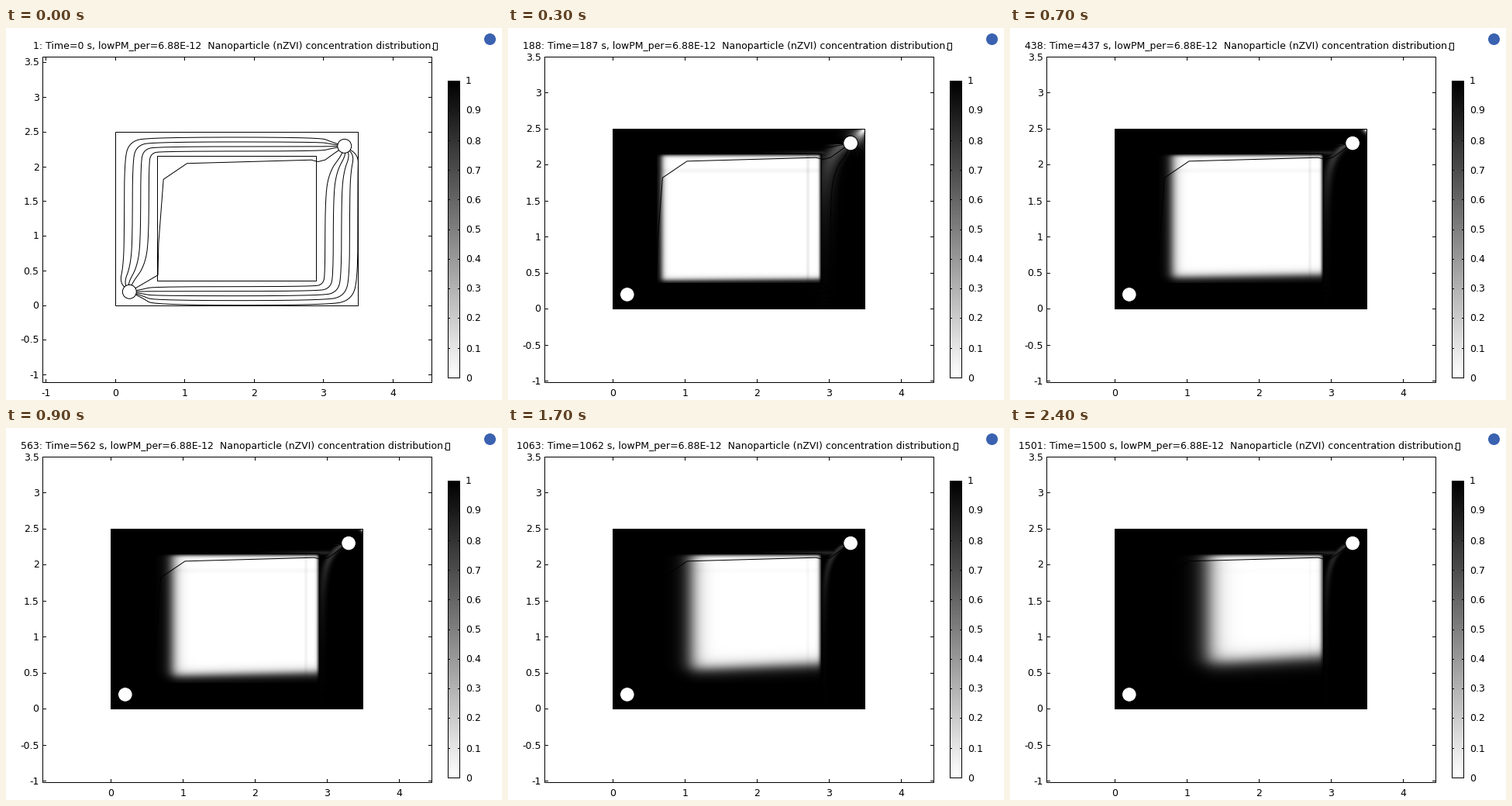
A matplotlib script that plays this animation: 640 by 480 pixels, repeating every 2500 ms.

```python
import numpy as np
import matplotlib.pyplot as plt
from matplotlib.animation import FuncAnimation
from matplotlib.patches import Circle, Rectangle

W, H, DPI = 640, 480, 80
PX = 72 / DPI
FRAMES, INTERVAL = 25, 100
STEP = 62.5  # simulated seconds per frame

plt.rcParams["font.family"] = "DejaVu Sans"
fig = plt.figure(figsize=(W / DPI, H / DPI), dpi=DPI, facecolor="white")
ax = fig.add_axes([0, 0, 1, 1])

# view: pixel position of the data origin and pixels per unit
START = (141.4, 358.2, 89.5)
ZOOM = (135.2, 362.5, 93.0)
BOX = (47, 37, 549, 457)
WIDE, TALL = 3.5, 2.5
INLET, OUTLET = (0.2, 0.2), (3.3, 2.3)
BLOCK = (0.6, 0.35, 2.9, 2.15)


def smooth(pts, rounds=4):
    """Corner cutting that keeps both ends."""
    p = np.array(pts, float)
    for _ in range(rounds):
        a, b = p[:-1], p[1:]
        cut = np.stack([0.75 * a + 0.25 * b, 0.25 * a + 0.75 * b], 1)
        p = np.vstack([p[:1], cut.reshape(-1, 2), p[-1:]])
    return p


def stream(k):
    """Line k, counted inwards from the wall, up the left and along the top."""
    x, y, r = 0.125 + 0.118 * k, 2.427 - 0.067 * k, 0.35 - 0.06 * k
    return smooth([
        INLET, (0.06 + 0.06 * k, 0.33), (0.85 * x, 0.55), (x, 0.9),
        (x, y - r), (x + 0.2 * r, y - 0.2 * r), (x + r, y),
        (2.95, y), (3.1, 0.5 * y + 1.15), OUTLET])


# the flow is symmetric under a half turn about the centre
STREAMS = [stream(k) for k in range(4)]
STREAMS += [(WIDE, TALL) - stream(k) for k in range(-1, 4)]
STREAMS.append(np.array([
    INLET, (0.61, 0.44), (0.62, 0.9), (0.69, 1.82), (1.03, 2.05),
    (2.82, 2.1), (2.92, 2.075), (3.02, 2.1), OUTLET]))

X0, Y0, X1, Y1 = 135, 130, 461, 363
X, Y = np.meshgrid(np.arange(X0, X1) + 0.5, np.arange(Y0, Y1) + 0.5)
INSIDE = (X > 191) & (X < 405) & (Y > 162.5) & (Y < 330)


def edge(u):
    return 0.5 * (1 + np.tanh(1.6 * u))


def bump(v, centre, width):
    return np.exp(-((v - centre) / width) ** 2)


def brightness(t):
    """Grey level of the field: 1 is clean, 0 is saturated."""
    r = np.sqrt(t)
    # block: fronts creep in from the left and the bottom
    left = edge((X - 190.5 - 0.0437 * t) / (0.74 * r - 3))
    foot = edge((328 - 0.014 * t - 4e-5 * t * (X - 200) - Y) / (0.45 * r))
    right = edge((402.3 - X) / (2.5 + 0.0015 * t))
    top = edge((Y - 164.5) / 4)
    ripple = 0.1 * bump(X, 387, 2) + 0.05 * bump(Y, 184, 3)
    block = left * foot * right * top * (1 - np.exp(-t / 900) * ripple)

    # channel: quick front, then a slow corner and a grey wake at the outlet
    dx, dy = X1 - X, Y - Y0
    front = edge(((X - X0 + Y1 - Y) / 540 - t / 95) / 0.19)
    d = dx + dy
    size = min(60, 24 * (187 / t) ** 1.4)
    corner = bump(d, 0, size) * bump(dx - dy, 0, 0.6 * d + 2)
    down = np.maximum(Y - 152, 0)
    amp = 0.2 + 0.15 * np.exp(-(t - 187) / 350)
    wake = amp * bump(X, 408 + 24 * np.exp(-down / 18),
                      4 + 26 * np.exp(-t / 180))
    wake = wake * np.exp(-down / 55) * (Y > 150)
    halo = 0.14 * bump(Y, 161, 2.5) * np.clip((X - 320) / 90, 0, 1) * (X < 420)
    channel = np.maximum.reduce([front, corner, wake, halo])
    return np.clip(np.where(INSIDE, block, channel), 0, 1)


def mid(v):
    """Centre of the pixel that holds v."""
    return np.floor(v) + 0.5


def line(x, y, **kw):
    ax.plot(x, y, color="black", lw=PX, snap=False, solid_capstyle="butt", **kw)


def outline(x0, y0, x1, y1):
    x0, y0, x1, y1 = map(mid, (x0, y0, x1, y1))
    ax.add_patch(Rectangle((x0, y0), x1 - x0, y1 - y0, fill=False, ec="black",
                           lw=PX, snap=False, zorder=3))


def label(x, y, s, ha="center"):
    ax.text(x, y, s, ha=ha, va="baseline", fontsize=12.5 * PX, color="black")


def picture(a, extent):
    ax.imshow(a, cmap="gray", vmin=0, vmax=1, extent=extent, aspect="auto",
              interpolation="nearest", zorder=1)


def draw_axes(view):
    ox, oy, s = view
    x0, y0, x1, y1 = BOX
    outline(*BOX)
    for v in range(-1, 5):
        x = mid(ox + v * s)
        if x > x0:
            line([x, x], [y0, y0 + 5])
            line([x, x], [y1 - 4, y1 + 1])
            label(x, 475, f"{v}")
    for v in np.arange(-1, 3.6, 0.5):
        y = mid(oy - v * s)
        line([x0, x0 + 5], [y, y])
        line([x1 - 4, x1 + 1], [y, y])
        label(42.5, y + 4, f"{v:g}", "right")


def draw_bar():
    picture(np.linspace(0, 1, 384)[:, None], (570, 586, 452, 68))
    outline(570, 68, 585, 451)
    for k in range(11):
        y = mid(451.5 - 38.3 * k)
        line([570, 573], [y, y])
        line([583, 586], [y, y])
        label(593, y + 4, f"{k / 10:g}", "left")


def draw_title(t):
    shift = 4 * (len(f"{t + 1}{t}") - 2)
    label(35 - shift, 27,
          f"{t + 1}: Time={t} s, lowPM_per=6.88E-12  "
          "Nanoparticle (nZVI) concentration distribution.", "left")
    outline(551 + shift, 19, 556 + shift, 28)


def draw_model(view):
    ox, oy, s = view

    def px(x, y):
        return ox + s * x, oy - s * y

    outline(*px(0, TALL), *px(WIDE, 0))
    outline(*px(*BLOCK[:2]), *px(*BLOCK[2:]))
    for p in STREAMS:
        line(*px(*p.T), zorder=2)
    for c in (INLET, OUTLET):
        ax.add_patch(Circle(px(*c), 0.1 * s, fc="white", ec="black", lw=PX,
                            zorder=4))


def draw(i):
    ax.cla()
    ax.axis("off")
    t = int(i * STEP)
    view = ZOOM if t else START
    if t:
        picture(brightness(t), (X0, X1, Y1, Y0))
    draw_model(view)
    draw_axes(view)
    draw_bar()
    draw_title(t)
    ax.add_patch(Circle((624.5, 14.5), 7.5, color="#3a62b0", lw=0))
    ax.set_xlim(0, W)
    ax.set_ylim(H, 0)
    return []


anim = FuncAnimation(fig, draw, frames=FRAMES, interval=INTERVAL, repeat=True)
plt.show()
```
